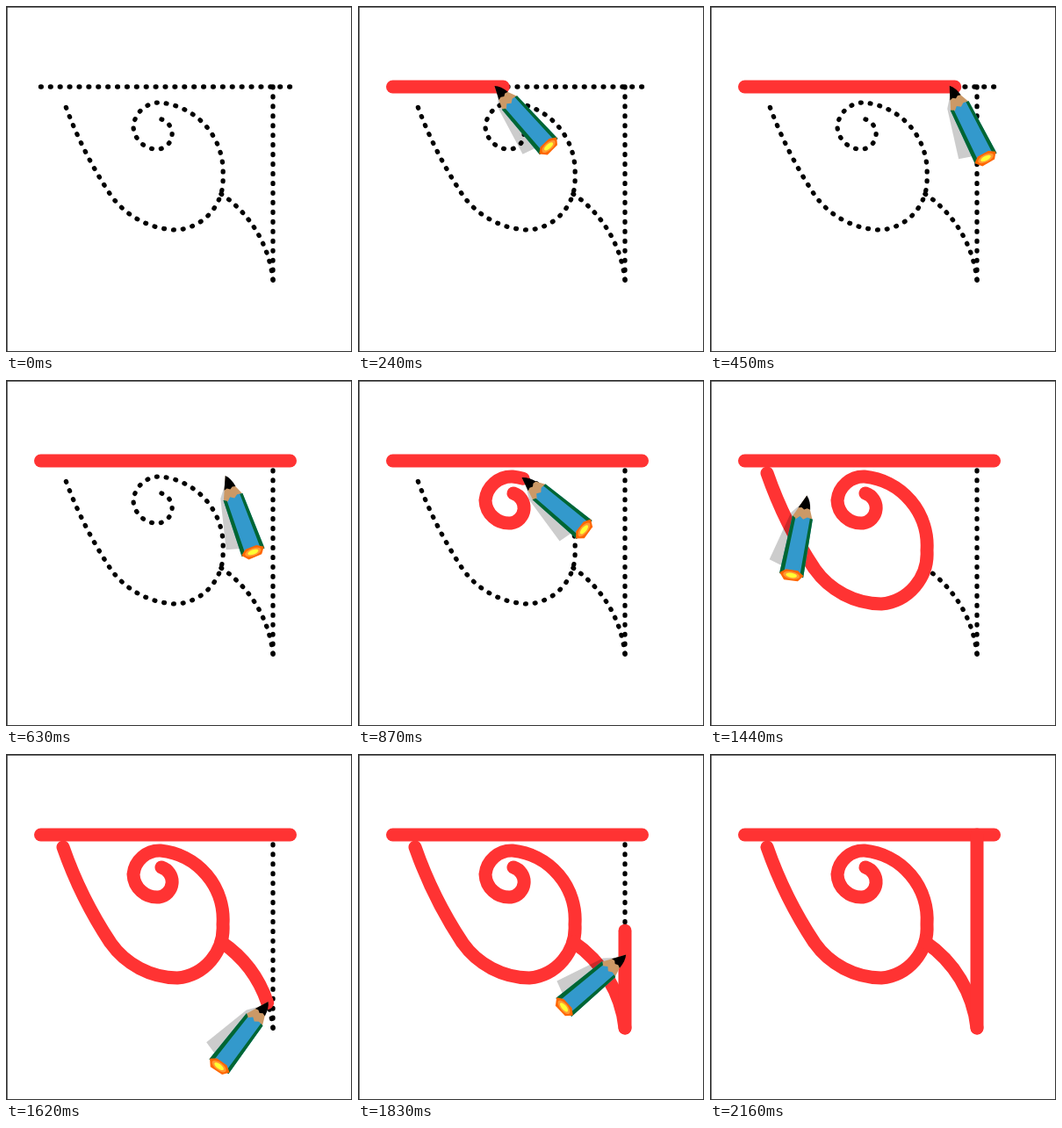
These frames come from a looping animation (394 px wide and 394 px high, 2340 ms). An HTML page:

```html
<!DOCTYPE html>
<html lang="en">
<head>
<meta charset="utf-8">
<title>Letter tracing</title>
<style>
  html, body { margin: 0; width: 100%; height: 100%; overflow: hidden; background: #fff; }
  svg { display: block; width: 100%; height: 100%; }
  #dots path, #ink path { fill: none; stroke-linecap: round; stroke-linejoin: round; }
  #dots path { stroke: #000; stroke-width: 5.3; }
  #ink path { stroke: #f33; stroke-width: 15; }
</style>
</head>
<body>
<svg viewBox="0 0 394 394">
  <rect width="394" height="394" fill="#fff"/>
  <g id="dots"></g>
  <g id="ink"></g>
  <g id="pencil">
    <path d="M0 3 L-14 21 L-28 78 L-14 82 L-4 78 L0 20Z" fill="#000" fill-opacity=".2"/>
    <g transform="translate(0 -1.5) scale(1.06 1.02)">
      <path d="M0 0 L-11 26 L-7 28 L1 28 L11 26Z" fill="#c96"/>
      <path d="M0 0 L-6.5 15 L-3 14 L0 16 L3 14 L6.5 15 Q5 5 0 0Z" fill="#000"/>
      <path d="M-11 25 L-7 28 L-3 24 L1 27 L5 24 L11 25 L13 91 H-13Z" fill="#39c"/>
      <path d="M-11 25 L-7.5 27 L-8.5 91 H-13Z M11 25 L8 24.5 L9 91 H13Z" fill="#063"/>
      <path d="M-13 90 L-7 85 L6 84.5 L13 89 L8 96 L-7 97Z" fill="#f60"/>
      <ellipse cy="90.7" rx="9" ry="4.2" fill="#f93"/>
      <ellipse cy="90.7" rx="6" ry="2.6" fill="#ff3"/>
    </g>
  </g>
  <path d="M0 0H394V394H0Z M1.7 1.7V393H393V1.7Z" fill="#333" fill-rule="evenodd"/>
</svg>
<script>
const STEP = 30, LOOP = 2340, LAST = 72;
const DOT = .8, SPACING = 11;

// from/to: steps; ease: power of time; lead: how far ink runs ahead of the tip;
// turn: pencil angle at both ends; swing: extra tilt midway
const strokes = [
  { d: "M39.5 92H323.5", from: 1, to: 18, ease: 1, lead: .13, turn: [-57, -20], swing: 0 },
  { d: "M177 129A17.5 17.5 0 0 1 174 163A27 27 0 0 1 145 137A30 30 0 0 1 176 110" +
       "A79 79 0 0 1 247 194A57.5 57.5 0 0 1 195 255A95 95 0 0 1 119 215A488 488 0 0 1 65 106",
    from: 24, to: 47, ease: .87, lead: 0, turn: [-20, 11], swing: -217 },
  { d: "M245 214A136 136 0 0 1 304 312", from: 51, to: 55, ease: 1, lead: 0, turn: [11, 46], swing: 0 },
  { d: "M304 312V92", from: 55, to: 71, ease: 1, lead: .55, turn: [46, 56], swing: 0 }
];

const mix = (a, b, t) => a + (b - a) * t;
const clamp = t => Math.max(0, Math.min(1, t));
const bump = t => t * (1 - t);

function addPath(parent, d) {
  const el = document.createElementNS("http://www.w3.org/2000/svg", "path");
  el.setAttribute("d", d);
  return document.getElementById(parent).appendChild(el);
}

for (const s of strokes) {
  const dots = addPath("dots", s.d);
  s.ink = addPath("ink", s.d);
  s.len = s.ink.getTotalLength();
  const period = (s.len - DOT) / Math.round(s.len / SPACING);
  dots.setAttribute("stroke-dasharray", `${DOT} ${period - DOT}`);
}
const pencil = document.getElementById("pencil");

const timeIn = (s, n) => clamp((n - s.from) / (s.to - s.from));

function poseOn(s, n) {
  const t = timeIn(s, n);
  const { x, y } = s.ink.getPointAtLength(s.len * t ** s.ease);
  return [x, y, mix(...s.turn, t) + s.swing * bump(t)];
}

// Follow the current stroke, or glide straight to the next one
function pose(n) {
  const i = Math.max(0, strokes.findIndex(s => n <= s.to));
  const next = strokes[i], prev = strokes[i - 1];
  const here = poseOn(next, n);
  if (!prev || n >= next.from) return here;
  const t = (n - prev.to) / (next.from - prev.to);
  return poseOn(prev, n).map((v, k) => mix(v, here[k], t));
}

function draw(n) {
  for (const s of strokes) {
    const t = timeIn(s, n) ** s.ease;
    const share = t + s.lead * bump(t);
    s.ink.style.display = share > 0 ? "" : "none";
    s.ink.setAttribute("stroke-dasharray", share < 1 ? `${s.len * share} ${s.len * 2}` : "none");
  }
  const shown = n > 0 && n < LAST;
  pencil.style.display = shown ? "" : "none";
  if (shown) {
    const [x, y, angle] = pose(Math.min(n, LAST - 1));
    pencil.setAttribute("transform", `translate(${x} ${y}) rotate(${angle})`);
  }
}

const start = performance.now();
function tick() {
  const time = (performance.now() - start) % LOOP;
  draw(Math.min(LAST, Math.floor(time / STEP)));
  requestAnimationFrame(tick);
}
draw(0);
requestAnimationFrame(tick);
</script>
</body>
</html>
```
